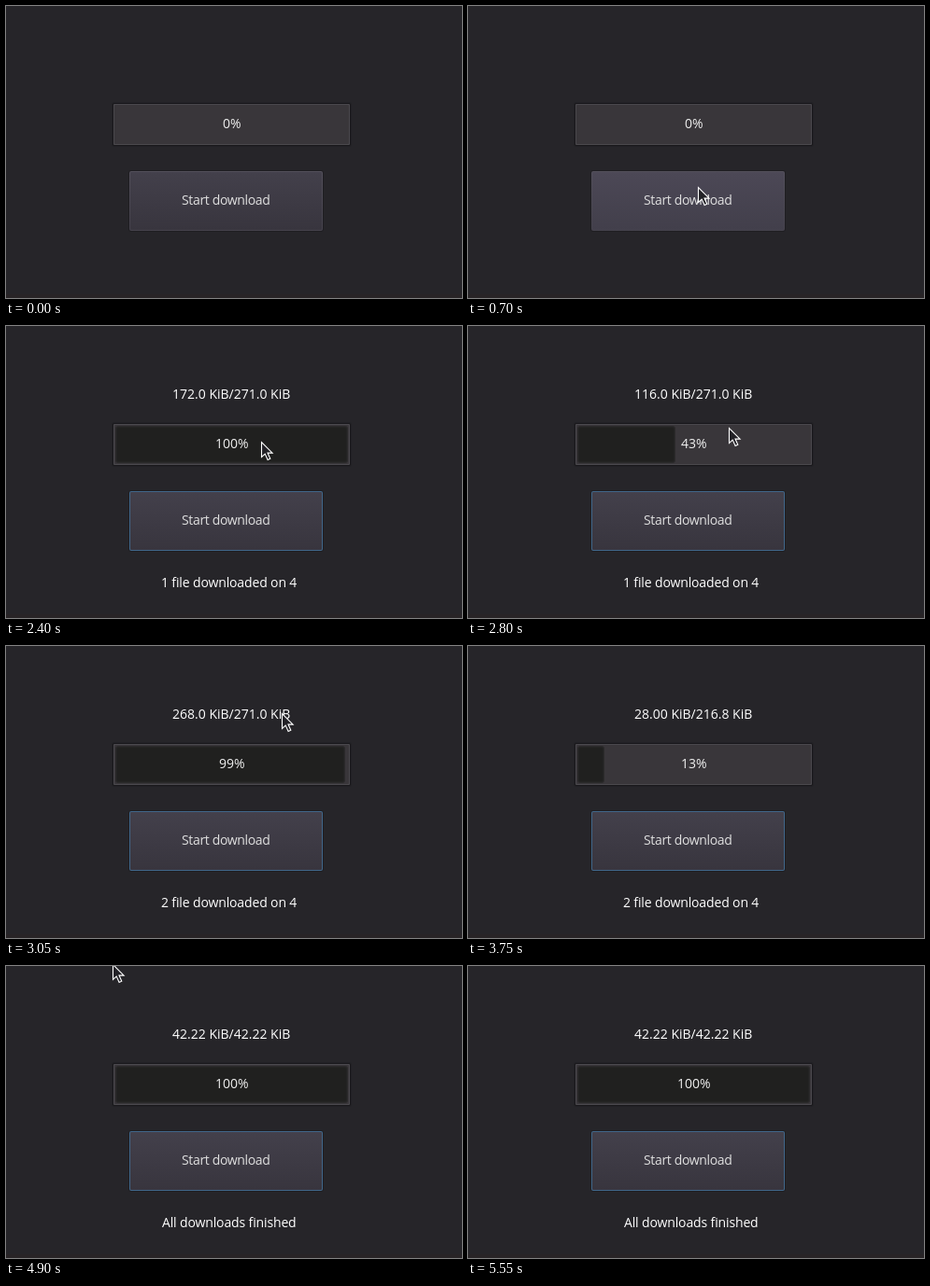
Recreate the animation shown at these times as an HTML page with a canvas. Size 488x313 px, loop 6500 ms.

```html
<!DOCTYPE html>
<html lang="en">
<head>
<meta charset="utf-8">
<title>Download progress</title>
<style>
html, body { margin: 0; width: 100%; height: 100%; overflow: hidden; background: #262529; }
canvas { display: block; }
</style>
</head>
<body>
<canvas id="stage" width="488" height="313"></canvas>
<script>
const ctx = document.getElementById('stage').getContext('2d');
const LOOP = 6500, TICK = 50;

// Sizes in KiB; `shown` is when the label switches to this file's size.
const files = [
  { shown: 1600, start: 1900, steps: 5, first: 28, last: 172, size: 172.1 },
  { shown: 2400, start: 2650, steps: 8, first: 24, last: 268, size: 271 },
  { shown: 3350, start: 3750, steps: 6, first: 28, last: 216, size: 216.8 },
  { shown: 4300, start: 4900, steps: 0, first: 42.22, last: 42.22, size: 42.22 }
];

// Pointer trips across the stage: [time, x, y]; hidden in between.
const trips = [
  [[150, 78, 0], [400, 165, 90], [700, 246, 194], [2150, 246, 194], [2400, 273, 124],
   [2700, 273, 124], [3050, 295, 72], [3300, 152, 1], [3350, 152, 1]],
  [[4350, 91, 4], [4550, 114, -2], [5100, 114, -2], [5250, 104, 3], [5500, 60, -7], [5550, 60, -7]]
];

function pointerAt(t) {
  const trip = trips.find(p => t >= p[0][0] && t < p[p.length - 1][0]);
  if (!trip) return null;
  const i = trip.findIndex(p => p[0] > t);
  const [t0, x0, y0] = trip[i - 1], [t1, x1, y1] = trip[i];
  const k = (t - t0) / (t1 - t0);
  return [Math.round(x0 + (x1 - x0) * k), Math.round(y0 + (y1 - y0) * k)];
}

function downloadAt(t) {
  const state = { got: 0, percent: 0, done: 0, total: 0 };
  for (const f of files) {
    if (t >= f.shown) state.total = f.size;
    if (t < f.start) continue;
    const step = Math.min(f.steps, Math.floor((t - f.start) / TICK));
    const finished = step === f.steps;
    state.got = finished ? f.last : Math.round((f.first + (f.last - f.first) * step / f.steps) / 4) * 4;
    state.percent = Math.round(100 * state.got / f.size);
    if (finished) state.done++;
  }
  return state;
}

const amount = kib => kib ? kib.toPrecision(4) + ' KiB' : '0 B';

function text(str, center, baseline, color, spacing = 0) {
  ctx.font = '14px "Open Sans", "Noto Sans", sans-serif';
  ctx.letterSpacing = spacing + 'px';
  ctx.fillStyle = color;
  ctx.fillText(str, Math.round(center - ctx.measureText(str).width / 2), baseline);
}

function box(x, y, w, h, r, fill) {
  ctx.fillStyle = fill;
  ctx.beginPath();
  ctx.roundRect(x, y, w, h, r);
  ctx.fill();
}

function vertical(y0, y1, top, bottom) {
  const g = ctx.createLinearGradient(0, y0, 0, y1);
  g.addColorStop(0, top);
  g.addColorStop(1, bottom);
  return g;
}

function drawBar(percent) {
  box(113, 103, 257, 48, 3, '#222126');
  box(114, 104, 255, 46, 2, '#19181b');
  box(115, 105, 253, 44, 1, '#4a484d');
  box(116, 106, 251, 42, 1, '#39363a');
  const w = Math.round(253 * percent / 100) - 4;
  if (w > 0) {
    box(117, 107, w, 40, 3, '#2b2a2b');
    box(118, 108, w - 2, 38, 2, '#242424');
    box(119, 109, w - 4, 36, 2, '#20201f');
  }
  text(percent + '%', 241.5, 131, '#f0f0f0');
}

function drawButton(hover, pressed, focused) {
  const [top, bottom] = pressed ? ['#312f37', '#3a3741'] : hover ? ['#4c4856', '#423f4b'] : ['#43404b', '#38353e'];
  box(131, 176, 209, 66, 3, '#1f1e22');
  box(132, 177, 207, 64, 2, focused ? '#41678a' : vertical(177, 241, '#53505b', '#45424c'));
  box(133, 178, 205, 62, 1, vertical(178, 240, top, bottom));
  text('Start download', 235.5, 213, '#e0e0e0', -0.34);
}

function drawPointer([x, y]) {
  ctx.save();
  ctx.translate(x + 0.5, y + 0.5);
  ctx.beginPath();
  [[0, 0], [0, 16], [3.7, 12.6], [6.6, 19], [9.3, 17.8], [6.5, 11.6], [11.6, 11.6]]
    .forEach(p => ctx.lineTo(...p));
  ctx.closePath();
  ctx.fillStyle = '#222126';
  ctx.fill();
  ctx.strokeStyle = '#fff';
  ctx.lineWidth = 1.1;
  ctx.stroke();
  ctx.restore();
}

function draw(now) {
  const t = Math.floor(now % LOOP / TICK) * TICK;
  const { got, percent, done, total } = downloadAt(t);
  const pointer = pointerAt(t);
  const hover = pointer && pointer[0] >= 132 && pointer[0] < 339 && pointer[1] >= 177 && pointer[1] < 241;

  ctx.fillStyle = '#262529';
  ctx.fillRect(0, 0, 488, 313);
  ctx.fillStyle = '#282426';
  ctx.fillRect(0, 309, 488, 4);

  if (total) text(amount(got) + '/' + amount(total), 241, 78, '#fff');
  drawBar(percent);
  drawButton(hover, t === 1250, t >= 1250);
  if (t >= 1300) {
    const status = done === files.length ? 'All downloads finished' : done + ' file downloaded on ' + files.length;
    text(status, 238.5, 280, '#fff', -0.14);
  }
  if (pointer) drawPointer(pointer);
}

const began = performance.now();
function frame() {
  draw(performance.now() - began);
  requestAnimationFrame(frame);
}
frame();
</script>
</body>
</html>
```
